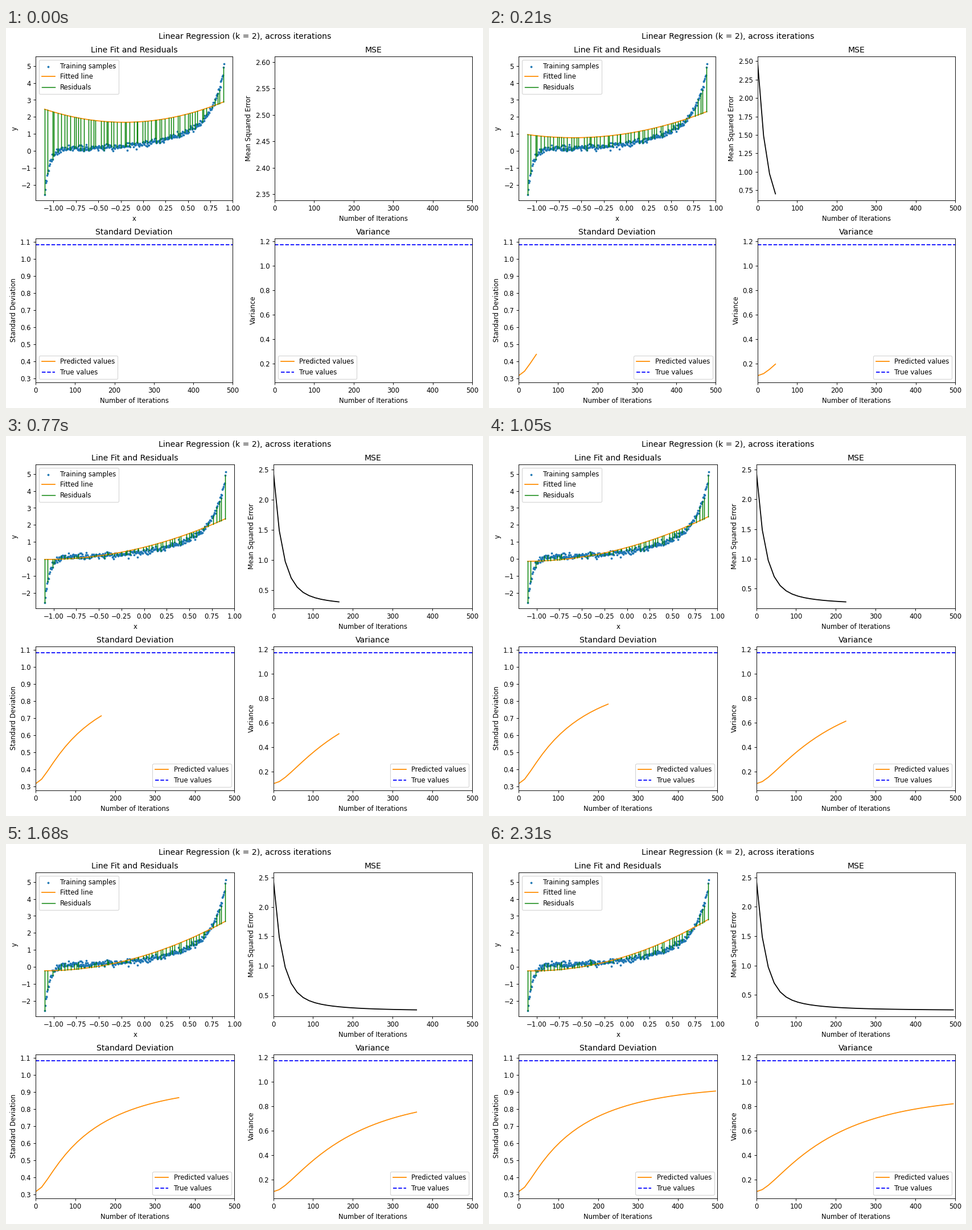
Write a matplotlib script that moves like this. It is 838x668 px and loops after 2.38 s.

```python
import numpy as np
import matplotlib.pyplot as plt
from matplotlib.animation import FuncAnimation

W, H, DPI = 838, 668, 84
FRAMES, STEP, RATE = 34, 15, 0.02
TRUE_VAR, MIN_MSE = 1.172, 0.229
LEFT, RIGHT, AXES_HEIGHT = 52, 819, 253
ROW_TOPS = (50.1, 369.7)

plt.rcParams["font.family"] = "DejaVu Sans"


def trend(x):
    """A gentle parabola that drops at the left end and soars at the right."""
    return (0.42 + 0.75 * x + 0.55 * x ** 2
            - 2.78 * np.exp(-18 * (x + 1.1))
            + 3 * np.exp(6.5 * (x - 0.9)) + 0.6 * np.exp(60 * (x - 0.9)))


rng = np.random.default_rng(4)
x = np.linspace(-1.1, 0.9, 360)
y = trend(x) + rng.normal(0, 0.09, x.size)
# One residual from every stretch of samples, at a random place within it
stride = 6
picked = np.arange(0, x.size, stride) + rng.integers(0, stride, x.size // stride)
picked[0] = 0

# Gradient descent on (constant, linear, quadratic) weights,
# for samples spread evenly over [-1.1, 0.9]
powers = np.add.outer(np.arange(3), np.arange(3)) + 1
gram = (0.9 ** powers - (-1.1) ** powers) / (2 * powers)
best = np.array([0.523, 1.804, 1.179])
start = np.array([1.732, 0.4125, 0.975])
decay = np.linalg.matrix_power(np.eye(3) - RATE * gram, STEP)
errors = [start - best]
for _ in range(FRAMES - 1):
    errors.append(decay @ errors[-1])
errors = np.array(errors)
weights = best + errors
iterations = STEP * np.arange(FRAMES)


def quadratic_form(v):
    return np.einsum("ni,ij,nj->n", v, gram, v)


mse = MIN_MSE + quadratic_form(errors)
variance = quadratic_form(weights) - (weights @ gram[0]) ** 2
deviation = np.sqrt(variance)

fig, axes = plt.subplots(2, 2, figsize=((W + 0.01) / DPI, (H + 0.01) / DPI),
                         dpi=DPI)
fig.text(419.8 / W, 1 - 18.5 / H,
         "Linear Regression (k = 2), across iterations",
         ha="center", va="baseline", fontsize=12)
fit_ax, mse_ax, std_ax, var_ax = axes.flat


def label(ax, title, xlabel, ylabel):
    ax.set_title(title)
    ax.set_xlabel(xlabel)
    ax.set_ylabel(ylabel)


def padded(lo, hi):
    pad = 0.05 * (hi - lo)
    return lo - pad, hi + pad


label(fit_ax, "Line Fit and Residuals", "x", "y")
fit_ax.scatter(x, y, s=5, color="tab:blue", label="Training samples")
fit_line, = fit_ax.plot([], [], color="darkorange", label="Fitted line")
residuals, = fit_ax.plot([], [], color="green", lw=1.25, snap=True,
                         label="Residuals")
fit_ax.set(xlim=padded(-1.1, 0.9), ylim=padded(-2.52, 5.17))
fit_ax.legend(loc="upper left")

label(mse_ax, "MSE", "Number of Iterations", "Mean Squared Error")
mse_line, = mse_ax.plot([], [], color="black")
mse_ax.set_xlim(0, 500)


def spread_panel(ax, name, true_value, first):
    label(ax, name, "Number of Iterations", name)
    line, = ax.plot([], [], color="darkorange", label="Predicted values")
    ax.plot([0, 500], [true_value] * 2, "b--", label="True values")
    ax.set(xlim=(0, 500), ylim=padded(first, true_value))
    return line


std_line = spread_panel(std_ax, "Standard Deviation", TRUE_VAR ** 0.5,
                        deviation[0])
var_line = spread_panel(var_ax, "Variance", TRUE_VAR, variance[0])


def place_axes(left_end, right_start):
    """Lay out the 2x2 grid from its inner edges, in pixels."""
    for row, top in zip(axes, ROW_TOPS):
        for ax, (a, b) in zip(row, [(LEFT, left_end), (right_start, RIGHT)]):
            ax.set_position([a / W, 1 - (top + AXES_HEIGHT) / H,
                             (b - a) / W, AXES_HEIGHT / H])


def update(n):
    c, b, a = weights[n]
    fitted = c + b * x + a * x ** 2
    fit_line.set_data(x, fitted)
    gaps = np.full(picked.size, np.nan)
    residuals.set_data(np.repeat(x[picked], 3),
                       np.column_stack([y[picked], fitted[picked], gaps]).ravel())

    for line, values in ((mse_line, mse), (std_line, deviation),
                         (var_line, variance)):
        line.set_data(iterations[:n + 1], values[:n + 1])
    lo, hi = (mse[n], mse[0]) if n else (0.95 * mse[0], 1.05 * mse[0])
    mse_ax.set_ylim(*padded(lo, hi))

    # Two-decimal tick labels need a wider gap between the columns
    place_axes(398.4, 472)
    tenths = np.diff(mse_ax.get_yticks())[0] * 10
    if abs(tenths - round(tenths)) < 1e-6:
        place_axes(401.4, 469.6)
    for ax in (std_ax, var_ax):
        ax.legend(loc="lower right" if n else "lower left")
    return []


anim = FuncAnimation(fig, update, frames=FRAMES, interval=70, repeat=True,
                     repeat_delay=0, blit=False)
plt.show()
```
